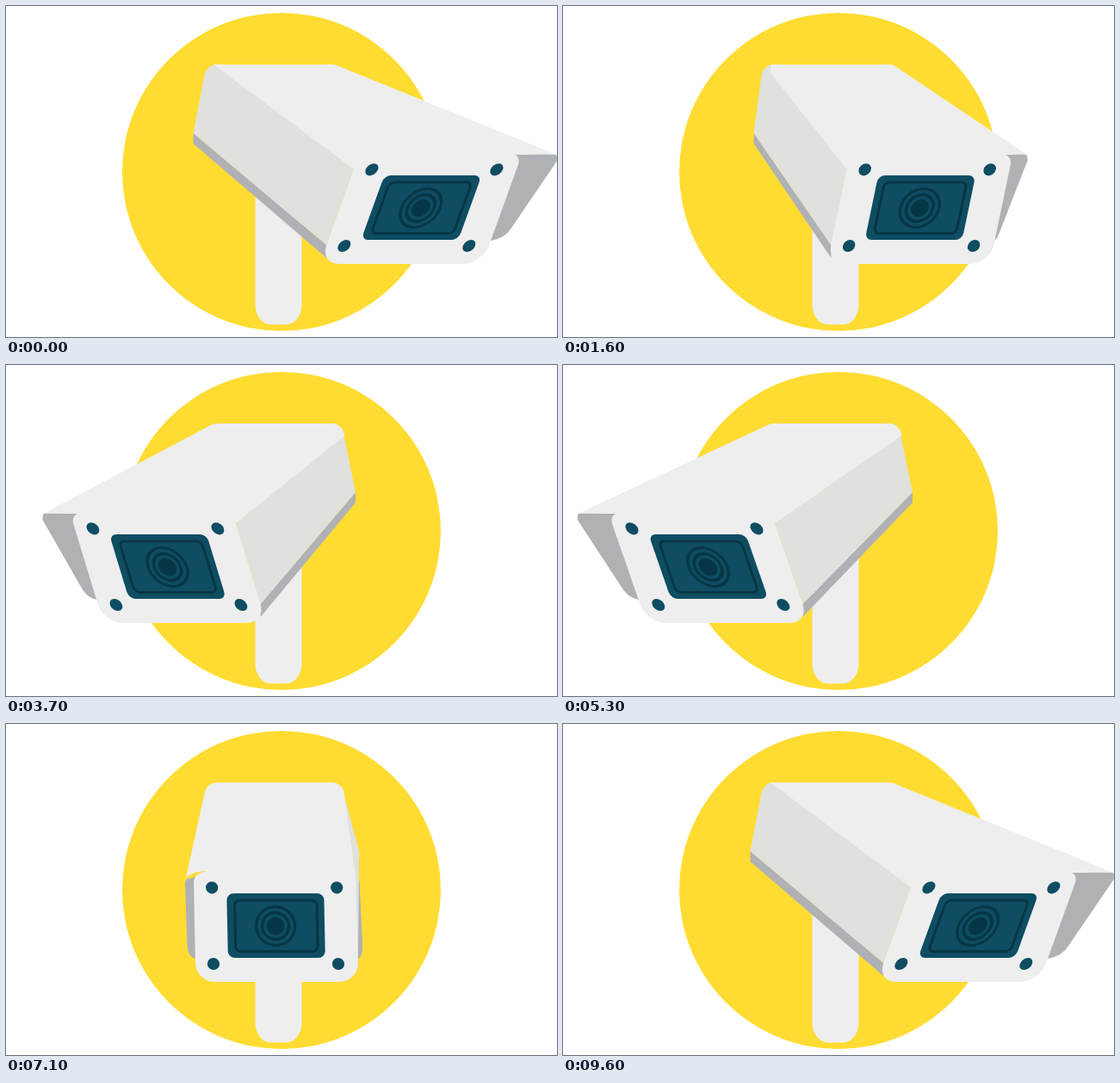
Write an HTML page with a canvas that moves like this. It is 640 px wide and 385 px high and loops after 9.7 s.

```html
<!DOCTYPE html>
<html lang="en">
<head>
<meta charset="utf-8">
<title>Security camera</title>
<style>
html, body { margin: 0; width: 100%; height: 100%; overflow: hidden; background: #fff; }
canvas { display: block; }
</style>
</head>
<body>
<canvas id="stage" width="640" height="385"></canvas>
<script>
const ctx = document.getElementById('stage').getContext('2d');
const LOOP = 9700, STEP = 100;
const YELLOW = '#ffdc32', LIGHT = '#eeeeee', SIDE = '#e0e0dd',
      GREY = '#b0b1b5', TEAL = '#0e4d62', DARK = '#063645';
const RIGHT = 425, LEFT = 74, CENTRE = 249;

const clamp = v => Math.max(0, Math.min(1, v));

// cubic-bezier(.5, 0, .5, 1)
function ease(x) {
  let lo = 0, hi = 1;
  for (let i = 0; i < 24; i++) {
    const s = (lo + hi) / 2;
    if (1.5 * s * (1 - s) + s * s * s < x) lo = s; else hi = s;
  }
  return lo * lo * (3 - 2 * lo);
}

// x of the top left screw: swing left, then back right
function swing(ms) {
  const away = ease(clamp(ms / 4720)) - ease(clamp((ms - 4790) / 4760));
  return RIGHT + (LEFT - RIGHT) * away;
}

function fill(color, draw) {
  ctx.fillStyle = color;
  ctx.beginPath();
  draw();
  ctx.fill();
}

function poly(color, ...pts) {
  fill(color, () => pts.forEach(p => ctx.lineTo(...p)));
}

function disc(color, x, y, r) {
  fill(color, () => ctx.arc(x, y, r, 0, 7));
}

function box(color, x, y, w, h, r) {
  fill(color, () => ctx.roundRect(x, y, w, h, r));
}

function ring(x, y, r, w) {
  ctx.lineWidth = w;
  ctx.beginPath();
  ctx.arc(x, y, r, 0, 7);
  ctx.stroke();
}

function camera(x) {
  const d = x - CENTRE;
  const shear = -0.1826 * d / 89;
  const edge = (s, y) => x + (s > 0 ? 168 : -21) + shear * (y - 190);
  const tip = s => s > 0
    ? x + 168 + 4.5 + .055 * d + .00108 * d * d
    : x - 21 - 9 + .165 * d - .0002 * d * d;
  const tipY = 173 + 9 * clamp(1 - Math.abs(d) / 80);

  function visor(s) {
    const t = tip(s), k = .0039 * d;
    fill(GREY, () => {
      ctx.moveTo(edge(s, 173) - s * 25, 172);
      ctx.lineTo(t - s * 4, tipY - 1);
      ctx.quadraticCurveTo(t, tipY - 1, t - s * .5, tipY + 7);
      ctx.lineTo(t - k * 78, 258);
      ctx.quadraticCurveTo(t - k * 88, 270, edge(s, 273), 273);
      ctx.lineTo(edge(s, 273) - s * 15, 273);
    });
  }

  function flank(s) {
    const back = s > 0 ? 406 + Math.max(0, (d + 150) * .03) : 217.5 + .055 * (176 - d);
    const front = edge(s, 278);
    poly(GREY, [back, 148], [back, 160], [front, 293], [front, 278]);
    if (s > 0) {
      poly(SIDE, [392, 80], [back, 148], [front, 278], [edge(s, 184), 184]);
      return;
    }
    fill(SIDE, () => {
      ctx.moveTo(front, 278);
      ctx.lineTo(back, 148);
      ctx.lineTo(230.5, 80);
      ctx.arc(245, 82.5, 14.5, Math.PI, Math.PI * 1.5);
      ctx.lineTo(edge(s, 190), 190);
    });
  }

  function hood() {
    const r = 14.5, y = 82.5;
    const tangent = (cx, s) => {
      const dx = tip(s) - cx, dy = tipY - y;
      return Math.atan2(dy, dx) - s * Math.acos(r / Math.hypot(dx, dy));
    };
    const lip = s => [edge(s, 173) - s * 14, 171];
    fill(LIGHT, () => {
      if (d > 0) {
        const k = clamp((176 - d) / 60), open = clamp(d / 60);
        ctx.moveTo(edge(-1, 190), 190);
        ctx.lineTo(231 + 10 * open, 68 + 10 * Math.max(k, 1 - open));
        ctx.lineTo(231 + 11 * open, 68 + 12 * (1 - open));
        ctx.lineTo(245, 68);
        ctx.arc(378.5, y, r, Math.PI * 1.5, tangent(378.5, 1) + 2 * Math.PI);
        ctx.lineTo(tip(1) - 1, tipY);
        ctx.quadraticCurveTo(tip(1) - 4, 172.5, ...(tipY > 173 ? lip(1) : [edge(1, 173) - 8, 173]));
        ctx.lineTo(edge(1, 195) - 10, 195);
      } else {
        ctx.moveTo(edge(-1, 195) + 10, 195);
        ctx.lineTo(...(tipY > 173 ? lip(-1) : [edge(-1, 173) + 8, 173]));
        ctx.quadraticCurveTo(tip(-1) + 4, 172.5, tip(-1) + 1, tipY);
        ctx.arc(245, y, r, tangent(245, -1), Math.PI * 1.5);
        ctx.arc(378.5, y, r, Math.PI * 1.5, Math.PI * 2);
        ctx.lineTo(edge(1, 184), 184);
      }
    });
  }

  function face() {
    ctx.save();
    ctx.transform(1, 0, shear, 1, x - shear * 190, 0);
    box(LIGHT, -21, 172, 189, 128, [13, 13, 22, 22]);
    for (const sx of [0, 145]) for (const sy of [190.3, 279]) disc(TEAL, sx, sy, 7.1);
    box(TEAL, 17, 197, 113, 75, 8);
    ctx.strokeStyle = DARK;
    ctx.lineWidth = 3;
    ctx.beginPath();
    ctx.roundRect(26, 205, 95.5, 59.5, 6);
    ctx.stroke();
    ring(73, 235, 22.5, 3.2);
    ring(73, 235, 15.5, 3.4);
    disc(DARK, 73, 235, 10.3);
    ctx.restore();
  }

  for (const s of [-1, 1]) if (s * d > -30) visor(s);
  flank(d > 0 ? -1 : 1);
  hood();
  face();
}

function draw(ms) {
  ctx.fillStyle = '#fff';
  ctx.fillRect(0, 0, 640, 385);
  disc(YELLOW, 320, 193, 185);
  const foot = { x: 18, y: 23 };
  box(LIGHT, 289.5, 150, 54, 220.5, [0, 0, foot, foot]);
  camera(swing(ms));
}

const start = performance.now();
function tick() {
  const ms = (performance.now() - start) % LOOP;
  draw(Math.floor(ms / STEP) * STEP);
  requestAnimationFrame(tick);
}
tick();
</script>
</body>
</html>
```
